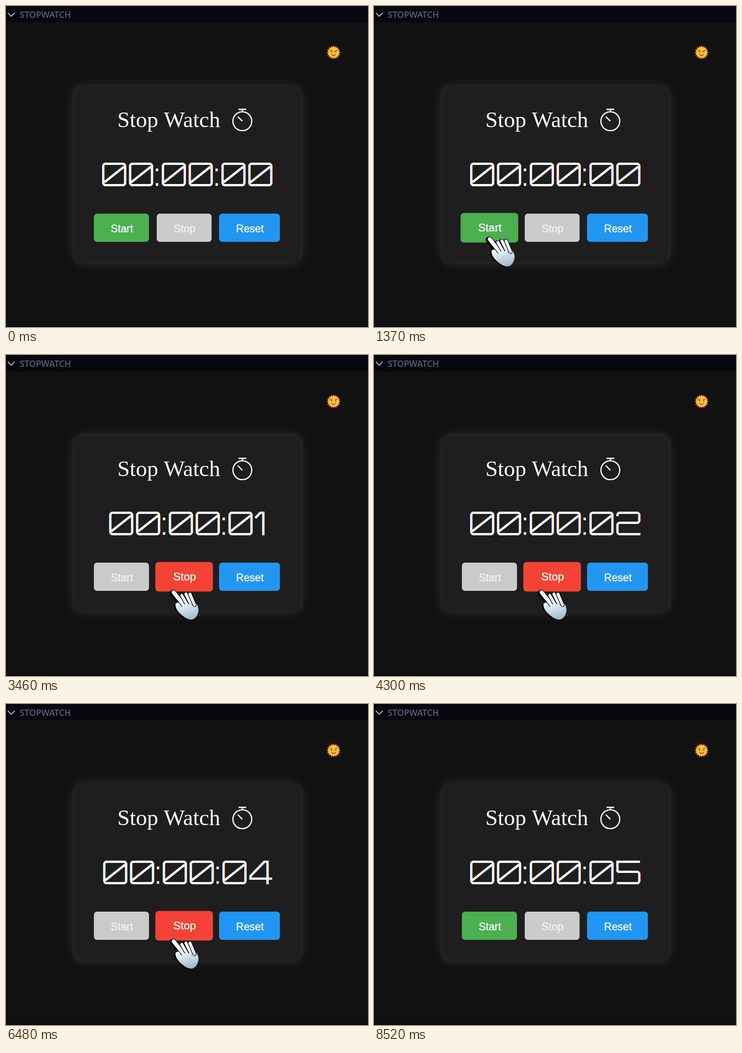
An HTML page with a canvas that plays this animation: 795 px wide and 705 px high, repeating every 8600 ms.

```html
<!DOCTYPE html>
<html lang="en">
<head>
<meta charset="utf-8">
<title>Stop Watch</title>
<style>
html, body { margin: 0; width: 100%; height: 100%; overflow: hidden; background: #111; }
canvas { display: block; }
</style>
</head>
<body>
<canvas id="stage" width="795" height="705" role="img" aria-label="Stop watch"></canvas>
<script>
const ctx = document.getElementById('stage').getContext('2d');
const LOOP = 8600, START = 1720, STOP = 6950, FADE = 250;
const HOVER = { Start: [1200, 2226], Stop: [2271, 7418] };
const GREY = '#cccbcc';

// time, x, y of the pointer's hot spot
const PATH = [
  [450, 60, 720], [1000, 225, 560], [1250, 250, 508], [1950, 250, 508],
  [2300, 335, 514], [2450, 357, 516], [2650, 364, 517], [6500, 364, 517],
  [7000, 358, 513], [7360, 358, 513], [7750, 200, 560], [8150, -40, 615]
];

const clamp = v => Math.max(0, Math.min(1, v));
const ease = v => { v = clamp(v); return 1 - (1 - v) ** 2.2; };
const within = (t, [a, b]) => t >= a && t < b;

function line(...pts) {
  ctx.moveTo(pts[0], pts[1]);
  for (let i = 2; i < pts.length; i += 2) ctx.lineTo(pts[i], pts[i + 1]);
}

function rounded(r, ...pts) {
  const n = pts.length;
  ctx.moveTo(pts[0], pts[1]);
  for (let i = 2; i < n - 2; i += 2) ctx.arcTo(pts[i], pts[i + 1], pts[i + 2], pts[i + 3], r);
  ctx.lineTo(pts[n - 2], pts[n - 1]);
}

function stroke(color, width) {
  ctx.strokeStyle = color;
  ctx.lineWidth = width;
  ctx.stroke();
}

function box(x, y, w, h, r, fill) {
  ctx.beginPath();
  ctx.roundRect(x, y, w, h, r);
  ctx.fillStyle = fill;
  ctx.fill();
}

function text(s, x, y, font, color) {
  ctx.font = font;
  ctx.fillStyle = color;
  ctx.fillText(s, x, y);
}

function backdrop() {
  box(0, 0, 795, 705, 0, '#111');
  box(0, 0, 795, 36, 0, '#080910');
  box(0, 702, 795, 3, 0, '#050506');
  ctx.beginPath();
  line(4, 15, 11.5, 22.5, 19, 15);
  stroke('#b4b5ba', 2.2);
  text('STOPWATCH', 30, 25.5, '600 19px "Open Sans", sans-serif', '#585d7a');
}

function sun() {
  ctx.save();
  ctx.translate(719.5, 102);
  ctx.beginPath();
  for (let i = 0; i < 32; i++) {
    const a = i * Math.PI / 16, r = i % 2 ? 12 : 15.5;
    ctx.lineTo(r * Math.cos(a), r * Math.sin(a));
  }
  ctx.closePath();
  ctx.fillStyle = '#e5762b';
  ctx.fill();
  ctx.beginPath();
  ctx.arc(0, 0, 11.8, 0, 7);
  ctx.fillStyle = '#fcbf3c';
  ctx.fill();
  ctx.beginPath();
  line(-8, -5, -2.5, -2.5);
  line(8, -5, 2.5, -2.5);
  line(-6, -1, -3, 0);
  line(6, -1, 3, 0);
  ctx.moveTo(-5, 4);
  ctx.quadraticCurveTo(0, 9, 5, 4);
  stroke('#8a4a1c', 1.7);
  ctx.restore();
}

function card() {
  ctx.save();
  ctx.shadowColor = 'rgba(255,255,255,.14)';
  ctx.shadowBlur = 24;
  box(148, 176, 501, 388, 20, '#1e1e1e');
  ctx.restore();
  stroke('#242424', 2);
  text('Stop Watch', 244.5, 266, '49px "Liberation Serif", serif', '#fff');
  ctx.beginPath();
  ctx.arc(519, 253, 20.7, 0, 7);
  line(510.5, 227, 527.5, 227);
  line(519, 227, 519, 232);
  line(509, 243, 519, 253);
  stroke('#f4f4f4', 2.8);
}

const GLYPHS = {
  0() { ctx.roundRect(2.5, 2.5, 48, 47, 5); line(5, 43, 48, 9); },
  1() { line(0, 14, 11, 2.5, 17.5, 2.5, 17.5, 52); },
  2() { rounded(5, 2.5, 10, 2.5, 2.5, 50.5, 2.5, 50.5, 24.5, 2.5, 24.5, 2.5, 49.5, 53, 49.5); },
  3() { rounded(5, 2.5, 10, 2.5, 2.5, 48.5, 2.5, 48.5, 49.5, 2.5, 49.5, 2.5, 42); line(8, 24.5, 48, 24.5); },
  4() { line(40, 52, 40, 2.5, 33, 2.5, 2.5, 34, 2.5, 39.5, 50, 39.5); },
  5() { line(52, 2.5, 2.5, 2.5, 2.5, 24.5); rounded(5, 2.5, 24.5, 50.5, 24.5, 50.5, 49.5, 1, 49.5); },
  ':'() { line(2.5, 13, 2.5, 19); line(2.5, 45, 2.5, 51); }
};
const advance = c => ({ ':': 13, 1: 28, 4: 54.5 })[c] || 59;

function clock(t) {
  const secs = t < START ? 0 : Math.floor((Math.min(t, STOP) - START) / 1000);
  const chars = [...'00:00:0' + secs];
  const width = chars.reduce((sum, c) => sum + advance(c), 0);
  ctx.save();
  ctx.globalCompositeOperation = 'lighter';
  // colour fringes as on an LCD
  [['#00f', -.7], ['#0f0', 0], ['#f00', .7]].forEach(([color, dx]) => {
    ctx.save();
    ctx.translate(401 - width / 2 + dx, 344);
    ctx.beginPath();
    for (const c of chars) {
      GLYPHS[c]();
      ctx.translate(advance(c), 0);
    }
    stroke(color, 5);
    ctx.restore();
  });
  ctx.restore();
}

function button(label, x, w, color, t) {
  const [enter, leave] = HOVER[label] || [LOOP, LOOP];
  const h = t < leave ? ease((t - enter) / FADE) : 1 - ease((t - leave) / FADE);
  ctx.save();
  ctx.translate(x + w / 2, 487);
  ctx.scale(1 + .05 * h, 1 + .05 * h);
  box(-w / 2, -31, w, 62, 7, color);
  ctx.textAlign = 'center';
  const ink = color === GREY ? '#f1f1f1' : '#f2f6f4';
  const y = h > 0 ? 7.5 : 9.5;
  text(label, 1, y, '23.3px "Liberation Sans", Arial, sans-serif', ink);
  ctx.strokeStyle = ink;
  ctx.lineWidth = .6;
  ctx.strokeText(label, 1, y);
  ctx.restore();
}

function shine(h) {
  const g = ctx.createLinearGradient(10, 0, 30, h);
  g.addColorStop(0, '#fff');
  g.addColorStop(.5, '#e6eef3');
  g.addColorStop(1, '#9dbccd');
  return g;
}

function hand() {
  const fingers = [[4, 4, 28, 34, 9], [22, 11, 34, 32, 7], [31, 8, 42, 30, 7], [40, 8, 50, 32, 7]];
  const palm = (fill, grow) => {
    ctx.beginPath();
    ctx.moveTo(12, 27);
    ctx.lineTo(26, 25);
    ctx.lineTo(51, 25);
    ctx.bezierCurveTo(58, 34, 62, 43, 55, 56);
    ctx.bezierCurveTo(48, 67, 38, 66, 27, 58);
    ctx.bezierCurveTo(16, 50, 9, 42, 8, 32);
    ctx.quadraticCurveTo(8, 28, 12, 27);
    ctx.fillStyle = fill;
    ctx.fill();
    if (grow) stroke(fill, grow);
  };
  const finger = ([a, b, c, d, w], color, grow) => {
    ctx.beginPath();
    line(a, b, c, d);
    stroke(color, w + grow);
  };
  ctx.lineCap = ctx.lineJoin = 'round';
  ctx.save();
  ctx.translate(-3, 1.5);
  fingers.forEach(f => finger(f, '#000', 3));
  palm('#000', 1);
  ctx.restore();
  const skin = shine(66);
  palm(skin, 0);
  fingers.forEach(f => { finger(f, '#000', 2); finger(f, skin, -.5); });
  ctx.beginPath();
  ctx.ellipse(37, 46, 18, 15, .6, 0, 7);
  ctx.fillStyle = skin;
  ctx.fill();
}

function arrow() {
  const shape = fill => {
    ctx.beginPath();
    line(0, 0, 36, 27, 20, 29, 11, 43);
    ctx.closePath();
    ctx.fillStyle = fill;
    ctx.fill();
    stroke(fill, 2);
  };
  ctx.lineJoin = 'round';
  ctx.save();
  ctx.translate(-3, 1.5);
  shape('#000');
  ctx.restore();
  shape(shine(42));
}

function forbidden() {
  ctx.beginPath();
  ctx.arc(0, 0, 16.5, 0, 7);
  ctx.fillStyle = '#7d1014';
  ctx.fill();
  ctx.beginPath();
  ctx.arc(0, 0, 13.5, 0, 7);
  ctx.fillStyle = '#fff';
  ctx.fill();
  line(-9, -9, 9, 9);
  stroke('#d3141b', 4.5);
}

function pointer(t) {
  const i = PATH.findIndex(p => p[0] > t);
  if (i < 1) return;
  const [a, b] = [PATH[i - 1], PATH[i]];
  const k = (t - a[0]) / (b[0] - a[0]);
  const onStart = within(t, HOVER.Start), onStop = within(t, HOVER.Stop);
  const running = within(t, [START, STOP]);
  const blocked = onStart ? running : !running;
  ctx.save();
  ctx.translate(a[1] + (b[1] - a[1]) * k, a[2] + (b[2] - a[2]) * k);
  if (!onStart && !onStop) arrow();
  else if (blocked) forbidden();
  else hand();
  ctx.restore();
}

function draw(now) {
  const t = now % LOOP, running = within(t, [START, STOP]);
  backdrop();
  sun();
  card();
  clock(t);
  button('Start', 193, 121, running ? GREY : '#4caf50', t);
  button('Stop', 331, 120.5, running ? '#f44336' : GREY, t);
  button('Reset', 468, 133.5, '#2196f3', t);
  pointer(t);
}

const origin = performance.now();
function tick() {
  draw(performance.now() - origin);
  requestAnimationFrame(tick);
}
tick();
</script>
</body>
</html>
```
